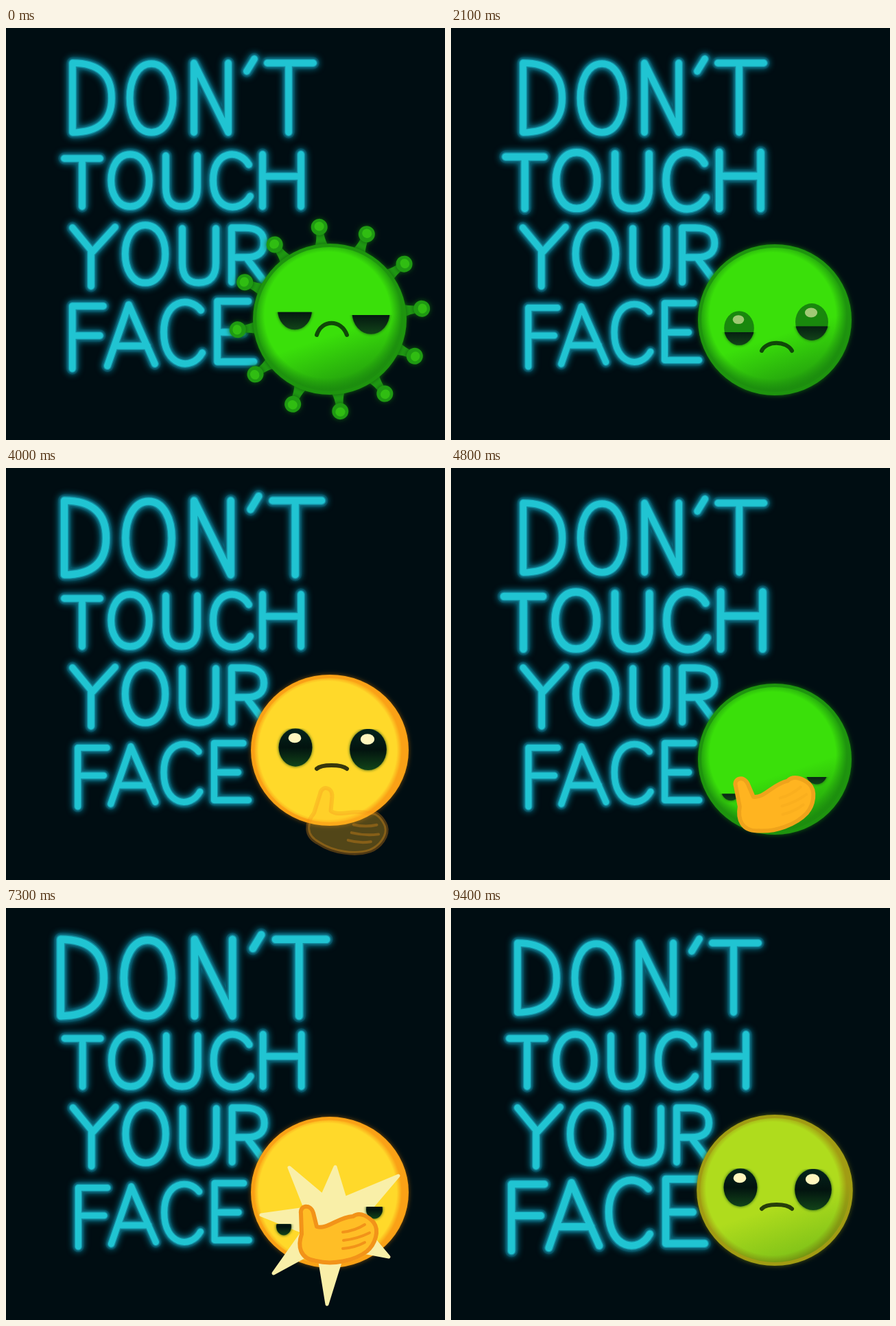
An HTML page with a canvas that plays this animation: 640 by 600 pixels, repeating every 9500 ms.

```html
<!DOCTYPE html>
<html lang="en">
<head>
<meta charset="utf-8">
<title>Don't touch your face</title>
<style>
html, body { margin: 0; width: 100%; height: 100%; overflow: hidden; background: #000d12; }
canvas { display: block; }
</style>
</head>
<body>
<canvas id="stage" width="640" height="600" role="img" aria-label="DON'T TOUCH YOUR FACE"></canvas>
<script>
const ctx = document.getElementById('stage').getContext('2d');
const LOOP = 9500, STEP = 100, CYCLE = 3.04, HOLD = 15;
const TAU = Math.PI * 2;

const clamp = v => Math.max(0, Math.min(1, v));
const lerp = (a, b, k) => a + (b - a) * k;
const smooth = (a, b, v) => { const k = clamp((v - a) / (b - a)); return k * k * (3 - 2 * k); };
const rgb = (c, alpha = 1) => `rgba(${c.map(Math.round).join()},${alpha})`;
const mix = (a, b, k) => a.map((v, i) => lerp(v, b[i], k));

// Smooth bump around a moment of the cycle, wrapping at its end.
function bump(p, peak, half) {
  let d = Math.abs(p - peak) % CYCLE;
  d = Math.min(d, CYCLE - d);
  return d < half ? Math.cos(d / half * Math.PI / 2) ** 2 : 0;
}

// Rows are [time, ...values].
function track(p, rows) {
  let i = 0;
  while (i < rows.length - 2 && p >= rows[i + 1][0]) i++;
  const a = rows[i], b = rows[i + 1], k = smooth(a[0], b[0], p);
  return a.slice(1).map((v, j) => lerp(v, b[j + 1], k));
}

// Neon lettering: strokes, scaling centre, size at rest, moment and strength of the pulse
const lines = [
  { d: `M97 51V152Q154 152 154 102Q154 51 97 51
        M212 52C254 52 254 152 212 152C170 152 170 52 212 52
        M274 152V51L324 152V51 M362 45L351 63 M381 51H448 M412 51V152`,
    cx: 271, cy: 102, rest: 1, peak: 1.08, gain: .105 },
  { d: `M85 190H137 M111 190V260
        M181 184C218 184 218 260 181 260C144 260 144 184 181 184
        M233 186V232Q233 260 256 260Q279 260 279 232V186
        M354 199C340 175 302 178 302 222C302 267 341 270 356 245
        M374 184V260 M430 184V260 M374 216H430`,
    cx: 257, cy: 222, rest: 1, peak: 1.8, gain: .11 },
  { d: `M97 291L126 326L159 290 M124 326V376
        M203 287C242 287 242 371 203 371C164 371 164 287 203 287
        M257 292V342Q257 371 281 371Q306 371 306 342V292
        M329 370V291H348Q376 291 376 313Q376 334 350 334H329 M350 334L377 370`,
    cx: 238, cy: 331, rest: 1, peak: 2.5, gain: .1 },
  { d: `M97 496V405H142 M97 448H137
        M148 492L179 403L217 489 M160 463H206
        M284 411C267 390 230 396 230 443C230 494 271 500 286 473
        M353 398H308V486H361 M308 443H345`,
    cx: 230, cy: 446, rest: .942, peak: .3, gain: .14 }
].map(line => ({ ...line, path: new Path2D(line.d) }));

function drawText(p) {
  const shift = 9 * bump(p, 1.82, .85);
  ctx.lineCap = ctx.lineJoin = 'round';
  for (const line of lines) {
    const s = line.rest + line.gain * bump(p, line.peak, .55);
    ctx.save();
    ctx.translate(line.cx + shift, line.cy);
    ctx.scale(s, s);
    ctx.translate(-line.cx, -line.cy);
    ctx.shadowColor = '#087289';
    ctx.shadowBlur = 10;
    ctx.strokeStyle = '#07485a';
    ctx.lineWidth = 17;
    ctx.stroke(line.path);
    ctx.shadowBlur = 4;
    ctx.shadowColor = '#138c9f';
    ctx.strokeStyle = '#138c9f';
    ctx.lineWidth = 12;
    ctx.stroke(line.path);
    ctx.shadowBlur = 0;
    ctx.strokeStyle = '#20c4d2';
    ctx.lineWidth = 9.5;
    ctx.stroke(line.path);
    ctx.restore();
  }
}

function ellipse(x, y, rx, ry, fill) {
  ctx.beginPath();
  ctx.ellipse(x, y, Math.max(rx, 0), Math.max(ry, 0), 0, 0, TAU);
  ctx.fillStyle = fill;
  ctx.fill();
}

function drawSpikes(y, size) {
  if (size <= .01) return;
  for (let i = 0; i < 12; i++) {
    ctx.save();
    ctx.translate(472, y);
    ctx.rotate((i * 30 - 6.5) * Math.PI / 180);
    const tip = 98 + 37 * size, bulb = 5 + 6 * Math.min(size, 1.1);
    ctx.shadowColor = '#0c5a0c';
    ctx.shadowBlur = 7;
    ctx.fillStyle = '#1f9a12';
    ctx.beginPath();
    ctx.moveTo(98, -15);
    ctx.quadraticCurveTo(110, -5, tip, -5);
    ctx.lineTo(tip, 5);
    ctx.quadraticCurveTo(110, 5, 98, 15);
    ctx.fill();
    ellipse(tip, 0, bulb + 1, bulb + 1, '#1f9a12');
    ctx.shadowBlur = 0;
    ellipse(tip + 1, 0, bulb * .6, bulb * .65, '#30bd12');
    ctx.restore();
  }
}

function drawBody(y, green) {
  const fill = mix([255, 217, 42], [58, 224, 10], green);
  const rim = mix([250, 161, 22], [30, 148, 14], green);
  const rx = lerp(115, 112, green), ry = 110;
  ctx.save();
  ctx.shadowColor = rgb(mix([120, 75, 8], [16, 100, 12], green));
  ctx.shadowBlur = 6;
  ellipse(472, y, rx, ry, rgb(rim));
  ctx.restore();
  const shade = ctx.createRadialGradient(469, y - 6 * green, 0, 469, y - 6 * green, 108);
  shade.addColorStop(0, rgb(fill));
  shade.addColorStop(lerp(.93, .85, green), rgb(fill));
  shade.addColorStop(1, rgb(rim));
  ellipse(472, y, rx - 5, ry - 5, shade);
  const low = ctx.createLinearGradient(455, y + 15, 485, y + 105);
  low.addColorStop(.15, 'rgba(28,140,14,0)');
  low.addColorStop(1, `rgba(28,140,14,${.8 * green})`);
  ellipse(472, y, rx - 5, ry - 5, low);
}

function drawEye(x, y, rx, ry, open, lid) {
  if (lid > 0) ellipse(x, y, rx, ry, `rgba(25,135,14,${lid})`);
  ctx.save();
  ctx.beginPath();
  ctx.rect(x - 40, y + ry - 2 * ry * open, 80, 2 * ry * open + 4);
  ctx.clip();
  const tone = ctx.createLinearGradient(0, y - ry, 0, y + ry);
  tone.addColorStop(0, '#04241c');
  tone.addColorStop(.5, '#02130f');
  tone.addColorStop(1, '#124419');
  ctx.shadowColor = '#164b12';
  ctx.shadowBlur = 4;
  ellipse(x, y, rx, ry, tone);
  ctx.restore();
  const shine = Math.max(smooth(.6, 1, open), lid * .6) * smooth(.5, .85, ry / 30);
  if (shine > 0) ellipse(x - 1, y - ry * .5, rx * .38, ry * .26, `rgba(255,246,190,${shine})`);
}

function drawMouth(y, arch, green) {
  ctx.beginPath();
  ctx.moveTo(453, y);
  ctx.bezierCurveTo(460, y - arch * 1.35, 489, y - arch * 1.35, 497, y);
  ctx.strokeStyle = rgb(mix([55, 55, 12], [16, 72, 8], green));
  ctx.lineWidth = 6;
  ctx.stroke();
}

function drawBurst(size) {
  if (size <= .01) return;
  const cx = 473, cy = 459;
  const tips = [[413, 378], [480, 377], [572, 390], [558, 508], [468, 577], [390, 532], [372, 447]];
  ctx.beginPath();
  tips.forEach(([x, y], i) => {
    const [nx, ny] = tips[(i + 1) % tips.length];
    const a = Math.atan2(y - cy, x - cx);
    let b = Math.atan2(ny - cy, nx - cx);
    if (b < a) b += TAU;
    const mid = (a + b) / 2, inner = 42 * Math.min(size, 1);
    ctx.lineTo(lerp(cx, x, size), lerp(cy, y, size));
    ctx.lineTo(cx + inner * Math.cos(mid), cy + inner * Math.sin(mid));
  });
  ctx.closePath();
  ctx.fillStyle = ctx.strokeStyle = '#f9efa8';
  ctx.lineWidth = 5;
  ctx.stroke();
  ctx.fill();
}

const palm = new Path2D(`M430 445C428 433 444 430 448 444L453 464
  C468 469 484 450 506 449C517 441 530 451 536 458C545 470 538 490 526 500
  C508 514 476 520 452 514C428 511 425 492 431 475Z`);
const fingers = new Path2D('M491 472Q509 470 523 461 M492 484Q512 482 530 473 M491 496Q508 495 523 487');

function drawHand(x, y, angle, alpha, soft) {
  if (alpha <= .01) return;
  ctx.save();
  ctx.globalAlpha = alpha;
  ctx.translate(482 + x, 480 + y);
  ctx.rotate(angle);
  ctx.translate(-482, -480);
  ctx.fillStyle = rgb(mix([255, 190, 38], [255, 180, 32], soft));
  ctx.strokeStyle = rgb(mix([242, 147, 25], [239, 163, 27], soft));
  ctx.lineWidth = 6;
  ctx.fill(palm);
  ctx.stroke(palm);
  ctx.lineWidth = 4;
  ctx.globalAlpha = alpha * (1 - soft * .7);
  ctx.stroke(fingers);
  ctx.restore();
}

// time, left eye x y, right eye x y, eye size, openness, mouth y, mouth arch, body y
const poses = [
  [0, 421, 411, 532, 415, .96, .45, 447, 17, 424],
  [.18, 422, 407, 528, 410, .94, 1, 438, 6, 411],
  [.88, 422, 407, 528, 410, .94, 1, 438, 5, 411],
  [1.1, 405, 464, 537, 439, .42, .65, 475, 0, 414],
  [1.66, 408, 468, 533, 443, .55, .3, 478, 4, 424],
  [2, 420, 437, 526, 428, .84, .38, 470, 11, 425],
  [2.3, 420, 419, 532, 420, 1, 1, 447, 17, 424],
  [3, 420, 419, 532, 420, 1, 1, 447, 17, 424],
  [3.04, 421, 411, 532, 415, .96, .45, 447, 17, 424]
];
// time, offset x y, angle, opacity, softness
const handMoves = [
  [0, 20, 65, .5, 0, 0],
  [.75, 20, 65, .5, 0, 0],
  [1.04, 0, 0, 0, 1, 0],
  [1.3, 0, 0, 0, 1, 0],
  [1.66, -10, 10, -.16, 1, 1],
  [1.94, -12, 35, -.2, 0, 1],
  [3.04, -12, 35, -.2, 0, 1]
];
// time, length
const spikeMoves = [[0, 1], [.2, .1], [.34, 0], [1.9, 0], [2.05, .12], [2.28, 1.13], [2.46, 1], [3.04, 1]];

function drawFace(p) {
  const [lx, ly, rx, ry, size, open, mouthY, arch, bodyY] = track(p, poses);
  const green = p < 1 ? 1 - smooth(0, .32, p) : smooth(1.2, 1.52, p);
  const lid = bump(p, 2.02, .24);
  ctx.save();
  ctx.globalAlpha = green;
  drawSpikes(bodyY, track(p, spikeMoves)[0]);
  ctx.restore();
  drawBody(bodyY, green);
  drawMouth(mouthY, arch, green);
  drawBurst(smooth(.96, 1.1, p) * (1 - smooth(1.26, 1.46, p)));
  drawEye(lx, ly, 26 * size, 29.5 * size, open, lid);
  drawEye(rx, ry, 28.5 * size, 32 * size, open, lid);
  drawHand(...track(p, handMoves));
}

function draw(now) {
  let step = Math.floor(now % LOOP / STEP);
  if (step >= HOLD) step--;
  const p = step * STEP / 1000 % CYCLE;
  ctx.fillStyle = '#000d12';
  ctx.fillRect(0, 0, 640, 600);
  drawText(p);
  drawFace(p);
}

const start = performance.now();
function tick() {
  draw(performance.now() - start);
  requestAnimationFrame(tick);
}
tick();
</script>
</body>
</html>
```
